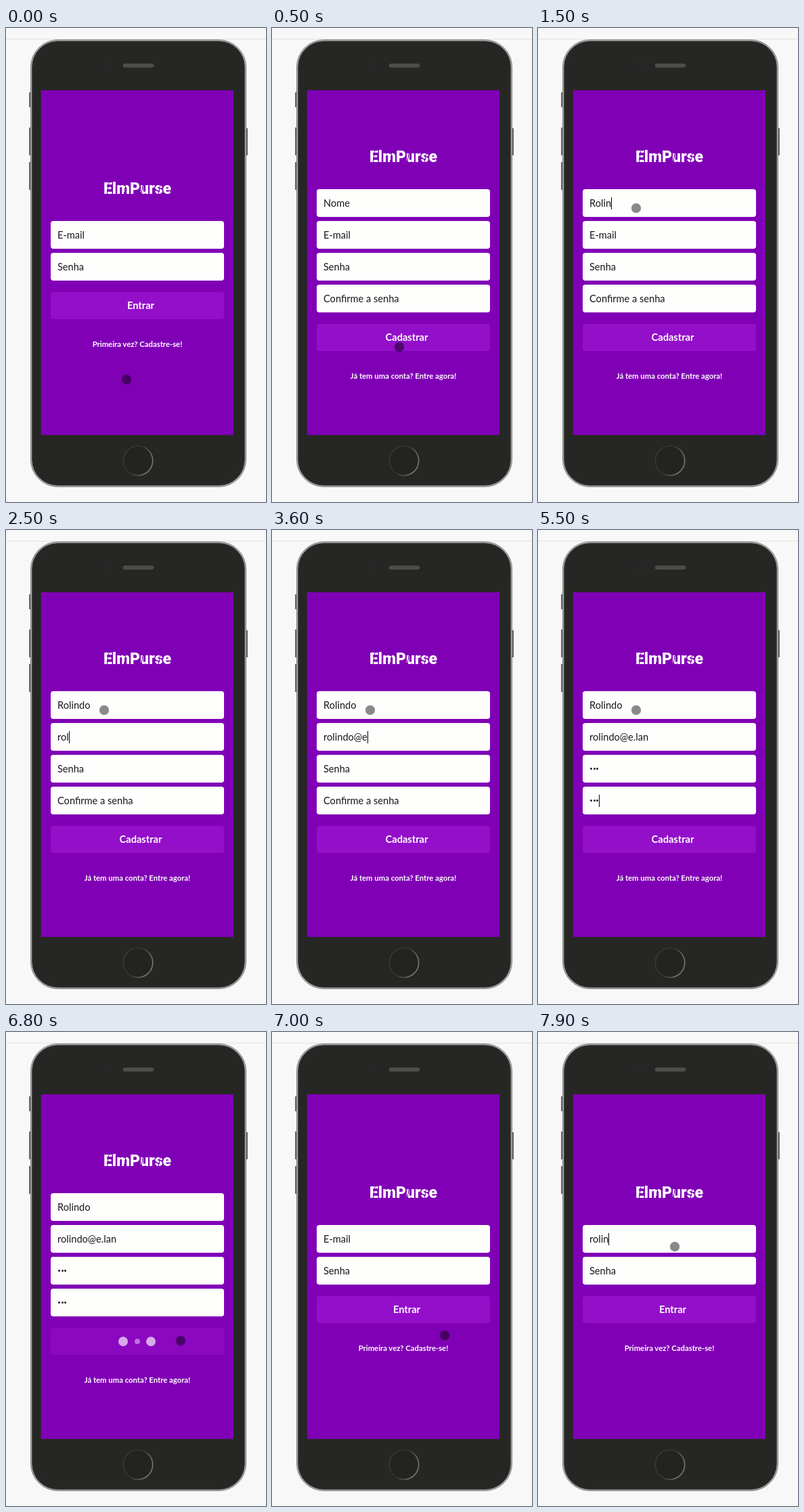
An HTML page for the animation above (8 s loop, 384 by 700 pixels).

```html
<!DOCTYPE html>
<html lang="pt">
<head>
<meta charset="utf-8">
<style>
html, body { margin: 0; width: 100%; height: 100%; overflow: hidden; background: #f7f8f7; }
#stage { position: relative; width: 384px; height: 700px; overflow: hidden; font: 14.6px Lato, sans-serif; }
#stage svg, #stage div { position: absolute; }
#stage div { white-space: pre; box-sizing: border-box; }
#stage .title {
  left: 52px; width: 284px; height: 30px; text-align: center; font: 900 23px/30px Roboto, sans-serif;
  color: transparent; -webkit-background-clip: text; background-clip: text;
  background-image: repeating-linear-gradient(100deg, #fff 0 24px, #8000b6 24px 25px);
}
.field, .button { left: 66px; width: 256px; border-radius: 4px; }
.field { height: 40.5px; padding-left: 10px; line-height: 41px; background: #fefefd; color: #181818; }
.field i { display: inline-block; width: 1px; height: 18px; vertical-align: -4px; margin-right: -1px; background: #000; }
.field b { display: inline-block; width: 3px; height: 3px; margin: 0 .9px; border-radius: 50%; vertical-align: 4px; background: #181818; }
.button { height: 40px; padding-left: 10px; line-height: 40px; background: #930fca; color: #fff; font-weight: 700; text-align: center; }
.button.busy { background: #8a08c0; }
.link { left: 52px; width: 284px; text-align: center; font-weight: 700; font-size: 11.3px; line-height: 14px; color: #fff; }
.dot { border-radius: 50%; background: #fff; }
#cursor { width: 14px; height: 14px; border-radius: 50%; background: rgba(0,0,0,.46); box-shadow: 0 0 1.5px rgba(0,0,0,.3); }
</style>
</head>
<body>
<div id="stage">
  <svg width="384" height="700">
    <defs>
      <linearGradient id="ring" x2="1" y2=".4">
        <stop stop-color="#3a3a38"/><stop offset=".55" stop-color="#333331"/><stop offset="1" stop-color="#777775"/>
      </linearGradient>
    </defs>
    <path d="M0 16.5H384" stroke="#e1e3e1"/>
    <path d="M35 95v22M35 147v41M35 198v41M356 148v40" stroke="#686a68" stroke-width="2"/>
    <rect x="36.5" y="17.5" width="318" height="660" rx="40" fill="#b2b4b2" stroke="#7c7e7c"/>
    <rect x="38.7" y="19.7" width="313.6" height="655.6" rx="37.5" fill="#262724" stroke="#3c3d3b"/>
    <rect x="173" y="53" width="45" height="5" rx="2.5" fill="#4c4d4b" stroke="#5c5d5b" stroke-width=".6"/>
    <circle cx="150" cy="55" r="2.5" fill="#1b1c22" stroke="#3b3c40" stroke-width=".7"/>
    <circle cx="195" cy="639" r="21.7" fill="#232421" stroke="url(#ring)" stroke-width="1.6"/>
    <rect x="51.7" y="92" width="284.3" height="509" fill="#8000b6"/>
  </svg>
  <div id="screen"></div>
  <div id="cursor"></div>
</div>
<script>
const LOOP = 8000, SIGNUP = 300, BUSY = 6000, LOGIN = 6950;
const screenBox = document.getElementById('screen'), cursor = document.getElementById('cursor');

// Cursor stops: time, x, y
const stops = [[0, 178, 519], [200, 188, 471], [500, 188, 471], [850, 145, 266], [5550, 145, 266],
  [5900, 258, 456], [6950, 258, 456], [7300, 202, 317], [LOOP, 202, 317]];

// Each field has focus from `from` to `to`; its characters appear from `start`, one per `step`
const field = (hint, text = '', from = 1e9, to = 1e9, start = 1e9, step = 100) => ({hint, text, from, to, start, step});
const signup = {
  top: 238, button: 'Cadastrar', link: 'Já tem uma conta? Entre agora!',
  fields: [
    field('Nome', 'Rolindo', 900, 1900, 1050),
    field('E-mail', 'rolindo@e.lan', 1900, 4400, 2100, 170),
    field('Senha', '•••', 4400, 5000, 4700),
    field('Confirme a senha', '•••', 5000, BUSY, 5200)
  ]
};
const login = {
  top: 285, button: 'Entrar', link: 'Primeira vez? Cadastre-se!',
  fields: [field('E-mail', 'rolindo', 7330, LOOP, 7450), field('Senha')]
};

const box = (cls, top, html) => `<div class="${cls}" style="top:${top}px">${html}</div>`;

function fieldHtml(f, t) {
  const count = Math.max(0, Math.min(f.text.length, Math.floor((t - f.start) / f.step) + 1));
  const last = count ? f.start + (count - 1) * f.step : f.from;
  const caret = t >= f.from && t < f.to && (t - last) % 1000 < 500 ? '<i></i>' : '';
  return count ? f.text.slice(0, count).replace(/•/g, '<b></b>') + caret : caret + f.hint;
}

// Three dots swelling linearly, the middle one out of phase
function loader(t) {
  const swing = Math.abs(1 - (t - BUSY) % 800 / 400);
  return [173.3, 194, 214.3].map((x, i) => {
    const k = i === 1 ? 1 - swing : swing, r = 4.2 + 2.8 * k;
    return `<div class="dot" style="left:${x - 66 - r}px;top:${20 - r}px;width:${2 * r}px;height:${2 * r}px;opacity:${.42 + .24 * k}"></div>`;
  }).join('');
}

function view(t) {
  const page = t >= SIGNUP && t < LOGIN ? signup : login;
  const busy = t >= BUSY && t < LOGIN;
  const buttonTop = page.top + page.fields.length * 47 + 11;
  return box('title', page.top - 62, 'ElmPurse')
    + page.fields.map((f, i) => box('field', page.top + i * 47, fieldHtml(f, t))).join('')
    + box(busy ? 'button busy' : 'button', buttonTop, busy ? loader(t) : page.button)
    + box('link', buttonTop + 70, page.link);
}

function moveCursor(t) {
  const i = stops.findIndex(s => s[0] > t), [t0, x0, y0] = stops[i - 1], [t1, x1, y1] = stops[i];
  const k = (t - t0) / (t1 - t0), e = k * k * (3 - 2 * k);
  cursor.style.left = x0 + (x1 - x0) * e - 7 + 'px';
  cursor.style.top = y0 + (y1 - y0) * e - 7 + 'px';
}

let shown = '';
function draw() {
  const t = performance.now() % LOOP, html = view(t);
  if (html !== shown) screenBox.innerHTML = shown = html;
  moveCursor(t);
  requestAnimationFrame(draw);
}
draw();
</script>
</body>
</html>
```
